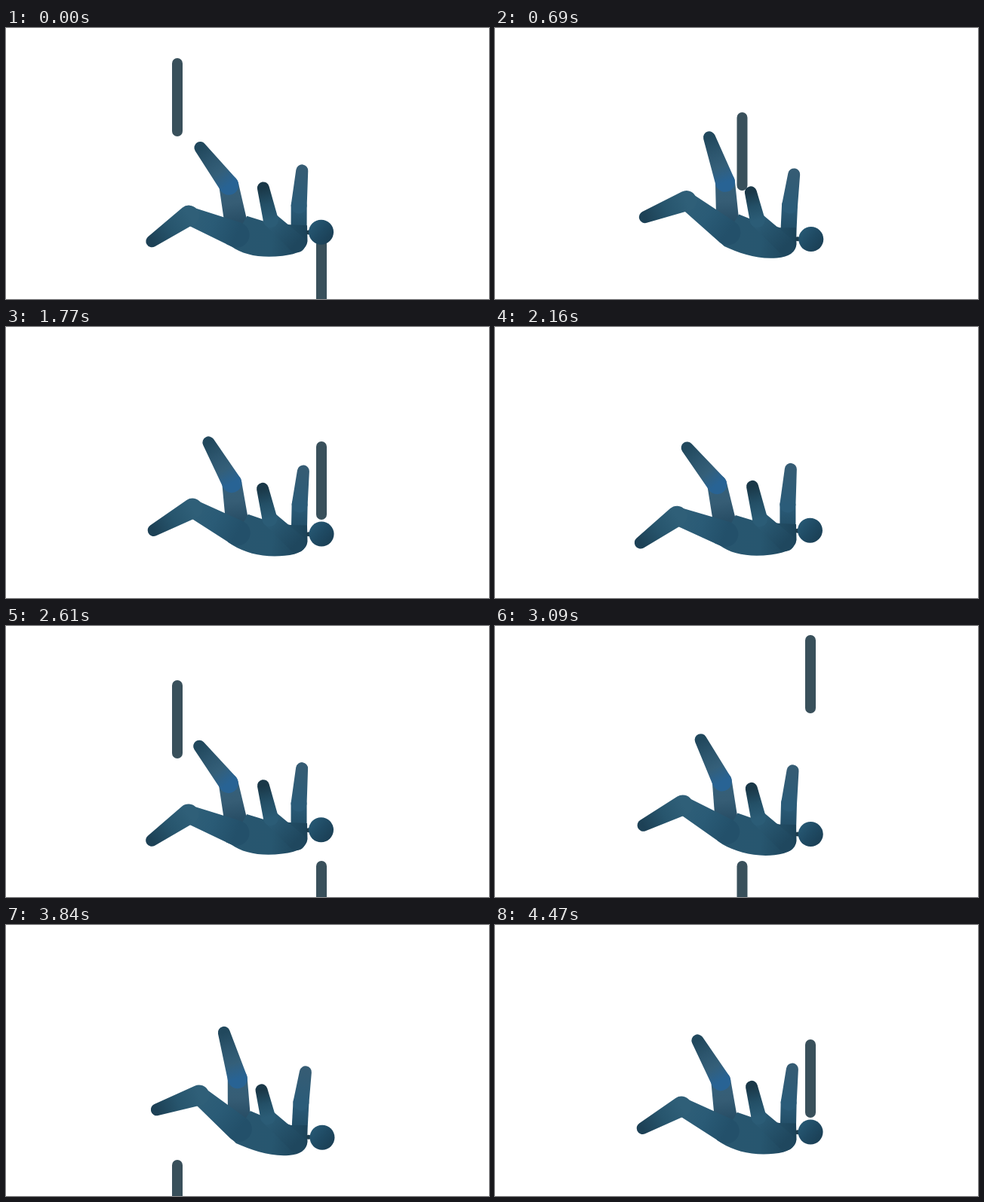
An HTML page with a canvas that plays this animation: 640x360 px, repeating every 4500 ms.

```html
<!DOCTYPE html>
<html lang="en">
<head>
<meta charset="utf-8">
<title>Figure and rising bars</title>
<style>
  html, body { margin: 0; width: 100%; height: 100%; overflow: hidden; background: #fff; }
  canvas { display: block; width: 640px; height: 360px; }
</style>
</head>
<body>
<canvas id="stage" width="640" height="360"></canvas>
<script>
const ctx = document.getElementById('stage').getContext('2d');
const LOOP = 4500, CYCLE = 2700, STEP = 30, SPEED = 2 / 3;

// Each bar has its top at y = 313 at time `at`.
const BARS = [
  { x: 418, at: 2640 },
  { x: 327.5, at: 390 },
  { x: 227, at: 1140 },
  { x: 418, at: 1530 },
  { x: 227, at: 2280 }
];

// Joints as [x, y] in the raised pose, then [x, y] in the lowered pose.
const JOINTS = {
  foot: [200, 244.5, 193, 285.5],
  knee: [256, 225.5, 241.5, 250.5],
  hip: [309, 271, 305.5, 275],
  farFoot: [289.5, 142.5, 255.5, 160],
  farKnee: [307, 204, 294.5, 209],
  farHip: [309, 255, 304, 257],
  hand: [338.5, 219.5, 341, 212],
  elbow: [347, 255, 351, 255],
  shoulder: [385, 290, 385, 286],
  farHand: [397, 195.5, 392, 189],
  farElbow: [391, 236, 388, 236],
  farShoulder: [388.5, 282, 388, 278],
  neck: [401, 282, 401, 271],
  head: [419, 282.5, 417.5, 270.5],
  waist: [324, 247, 319, 250],
  chest: [338, 253, 342, 257],
  armpit: [378, 266, 376, 261],
  nape: [399, 266, 399, 262],
  back: [399.5, 288, 399.5, 283],
  backCurve: [398, 304, 398, 299],
  ribs: [375, 306, 366, 302.5],
  spineA: [351, 308, 338, 306],
  spineB: [326, 299, 314, 302],
  seat: [305, 290, 298, 290],
  rump: [298, 283, 291, 287]
};

const mod = (a, n) => ((a % n) + n) % n;

function phaseAt(ms) {
  const t = Math.floor(mod(mod(ms, LOOP), CYCLE) / STEP + 1e-6) * STEP;
  if (t < 60) return -12;
  // A few pictures stay for two steps.
  return [1080, 2160, 2610].includes(t) ? t + STEP : t;
}

function poseAt(t) {
  const k = 0.54 + 0.537 * Math.cos((t - 2380) / CYCLE * 2 * Math.PI);
  const pose = {};
  for (const [name, [x0, y0, x1, y1]] of Object.entries(JOINTS)) {
    pose[name] = [x0 + (x1 - x0) * k, y0 + (y1 - y0) * k];
  }
  return pose;
}

function blend(p, q, colors) {
  const g = ctx.createLinearGradient(...p, ...q);
  colors.forEach((c, i) => g.addColorStop(i / (colors.length - 1), c));
  return g;
}

function disc([x, y], r, fill) {
  ctx.fillStyle = fill;
  ctx.beginPath();
  ctx.arc(x, y, r, 0, 2 * Math.PI);
  ctx.fill();
}

// Hull of two circles, shaded along its axis.
function limb(p, q, r1, r2, ...colors) {
  const dx = q[0] - p[0], dy = q[1] - p[1];
  const angle = Math.atan2(dy, dx);
  const spread = Math.acos((r1 - r2) / Math.hypot(dx, dy));
  ctx.fillStyle = blend(p, q, colors);
  ctx.beginPath();
  ctx.arc(...p, r1, angle + spread, angle - spread + 2 * Math.PI);
  ctx.arc(...q, r2, angle - spread, angle + spread);
  ctx.closePath();
  ctx.fill();
}

function drawBar({ x, at }, t) {
  const age = mod(t - at + 150, CYCLE) - 150;
  const y = 313 - age * SPEED;
  if (y > 361 || y < -104) return;
  ctx.fillStyle = '#39505b';
  ctx.beginPath();
  ctx.roundRect(x - 7, y - 1, 14, 104, 7);
  ctx.fill();
}

function drawTorso(p) {
  ctx.fillStyle = blend(p.hip, p.back, ['#28566f', '#27566f', '#1c4258']);
  ctx.beginPath();
  ctx.moveTo(...p.hip);
  for (const joint of [p.waist, p.chest, p.armpit, p.nape, p.back]) ctx.lineTo(...joint);
  ctx.quadraticCurveTo(...p.backCurve, ...p.ribs);
  ctx.bezierCurveTo(...p.spineA, ...p.spineB, ...p.seat);
  ctx.lineTo(...p.rump);
  ctx.closePath();
  ctx.fill();
}

function drawFigure(p) {
  limb(p.farElbow, p.farShoulder, 10.5, 10.5, '#2b5c79', '#1f485f');
  limb(p.farHand, p.farElbow, 8, 10.5, '#355c74', '#2b5c79');

  limb(p.farKnee, p.farHip, 13, 15, '#35607a', '#365d75', '#284e66');
  limb(p.farFoot, p.farKnee, 8, 13, '#21485d', '#2c556d', '#345f79', '#286394');

  drawTorso(p);
  limb(p.elbow, p.shoulder, 10, 12, '#2b5c76', '#1f475e');
  limb(p.hand, p.elbow, 8, 10, '#1a3848', '#234f66', '#2b5c76');

  limb(p.knee, p.hip, 12, 17, '#2f5f78', '#2a5b76', '#23506a');
  limb(p.foot, p.knee, 8, 13.5, '#1d4156', '#27556d', '#2f5f78');

  disc(p.neck, 3, '#1d3d4e');
  const [x, y] = p.head;
  disc(p.head, 16.5, blend([x - 12, y - 10], [x + 12, y + 10], ['#265772', '#1f4a63', '#1b4056']));
}

function draw(ms) {
  const t = phaseAt(ms);
  ctx.fillStyle = '#fff';
  ctx.fillRect(0, 0, 640, 360);
  for (const bar of BARS) drawBar(bar, t);
  drawFigure(poseAt(t));
}

let start;
function tick(now) {
  start ??= now;
  draw(now - start);
  requestAnimationFrame(tick);
}
draw(0);
requestAnimationFrame(tick);
</script>
</body>
</html>
```
